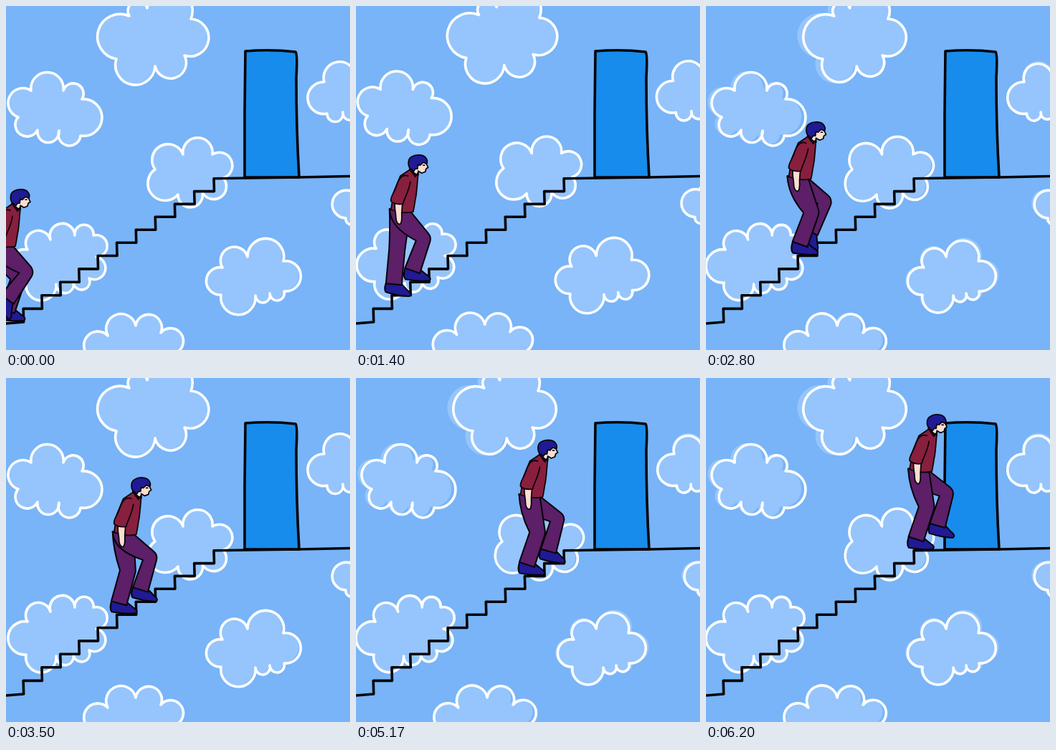
An HTML page with a canvas that plays this animation: 480 px wide and 480 px high, repeating every 6230 ms.

```html
<!DOCTYPE html>
<html lang="en">
<head>
<meta charset="utf-8">
<title>Stairs in the sky</title>
<style>
html, body { margin: 0; width: 100%; height: 100%; overflow: hidden; background: #78b4f7; }
canvas { display: block; width: 480px; height: 480px; }
</style>
</head>
<body>
<canvas id="stage" width="480" height="480"></canvas>
<script>
const ctx = document.getElementById('stage').getContext('2d');
const LOOP = 6230;
const INK = '#050308', SKIN = '#f9ded2', HAIR = '#201a94', SHIRT = '#881f3e', TROUSERS = '#5c1f68';

// A cloud is a ring of notches, clockwise, joined by arcs a little over a half circle.
function puffs(points) {
  const arcs = points.map(([x, y], i) => {
    const [px, py] = points.at(i - 1), r = 0.504 * Math.hypot(x - px, y - py);
    return `A${r},${r} 0 1 1 ${x},${y}`;
  });
  return new Path2D(`M${points.at(-1)}${arcs.join('')}Z`);
}

// The outline wobbles by moving its left and right ends; the last shape is also the fill.
const clouds = [];
function cloud(left, right, ...points) {
  const xs = points.map(p => p[0]), min = Math.min(...xs), span = Math.max(...xs) - min;
  const wobble = (amount, shift) => puffs(points.map(([x, y]) =>
    [x + amount * (left + (right - left) * (x - min) / span) + shift, y + shift]));
  clouds.push([wobble(0, 0), wobble(1, 0), wobble(0.15, -1.5)]);
}

cloud(9, -4, [154, 74], [172, 14], [197, 3], [258, 18], [249, 69], [208, 84]);
cloud(5, 5, [35, 118], [80, 118], [106, 130], [104, 181], [74, 174], [44, 173], [17, 155]);
cloud(0, -5, [448, 150], [444, 106], [488, 100], [490, 148], [470, 148]);
cloud(-4, 2, [208, 228], [247, 207], [288, 207], [303, 240], [274, 260], [240, 263]);
cloud(-3, -4, [30, 340], [62, 326], [96, 320], [122, 320], [126, 350], [116, 380], [94, 386], [70, 388], [28, 386]);
cloud(2, -7, [302, 365], [337, 350], [387, 356], [388, 398], [368, 401], [348, 404], [300, 403]);
cloud(0, 4, [118, 490], [142, 460], [181, 446], [216, 456], [240, 482]);
cloud(3, 3, [474, 296], [480, 258], [500, 270], [490, 296]);

// Corner of each stair: an even climb with a slight sag.
function stair(i) {
  const sag = 3 * Math.sin(Math.PI * i / 11);
  return [26.5 * i - 1.5 - sag, 441 - 18.2 * i - sag / 2];
}

const stairs = new Path2D('M-2,444 L0,443');
for (let i = 1; i < 12; i++) {
  const [x, y] = stair(i);
  stairs.lineTo(x + 0.5, stair(i - 1)[1]);
  stairs.lineTo(x, y);
}
stairs.lineTo(409, 239);
stairs.lineTo(482, 237.5);
const door = new Path2D('M333,239 L333,150 L334,63 Q370,60 404,64 Q407,67 405,100 Q405,170 409,239Z');

const shoe = new Path2D('M-10,-4 C-12,3 -13,8 -10,12 C0,14 12,15 23,14 C27,12 24,8 20,6 L9,-3Z');
const face = new Path2D('M-6,4 L12,-3 L13,2 L15,6 L12,8 L11,12 L6,14 L1,11 L1,17 L-8,12Z');
const hair = new Path2D('M-9,9 C-14,4 -14,-6 -8,-9 C-2,-13 9,-12 12,-7 C14,-4 14,-1 13,1 L8,-1 L4,3 L1,2 L0,8 L-3,8 L-5,11Z');
const torso = new Path2D('M-9,8 L-2,17 L1,15 C0,25 -1,40 -2,46 C-4,55 -4,60 -6,68 C-14,70 -26,69 -37,65 L-33,40 L-24,18Z');
const hand = new Path2D('M-31,54 C-33,62 -30,68 -30,76 C-30,82 -27,86 -24,85 C-21,82 -22,74 -22,70 L-21,56Z');
const sleeve = new Path2D('M-13,18 C-22,14 -27,24 -30,34 C-33,42 -38,47 -37,53 C-33,57 -27,58 -20,57 C-19,50 -12,40 -10,26');
const details = new Path2D('M-11,8 L-3,19 L1,13 M8,3 L10,3');

function paint(path, fill) {
  ctx.fillStyle = fill;
  ctx.fill(path);
  ctx.stroke(path);
}

// Point beside (x, y), in front of the line between two joints for a positive width.
function beside(x, y, from, to, width) {
  const dx = to[0] - from[0], dy = to[1] - from[1], d = width / Math.hypot(dx, dy);
  return [x + dy * d, y - dx * d];
}

// Thigh and shin are equally long, so the knee lies in front of the middle.
function leg(hip, [ax, ay, angle]) {
  const [hx, hy] = hip, ankle = [ax, ay], BONE = 47;
  const reach = Math.hypot(ax - hx, ay - hy) / 2;
  const bend = Math.sqrt(Math.max(0, BONE ** 2 - reach ** 2));
  const knee = beside((hx + ax) / 2, (hy + ay) / 2, hip, ankle, bend);

  ctx.save();
  ctx.translate(ax, ay);
  ctx.rotate(angle);
  paint(shoe, HAIR);
  ctx.restore();

  const path = new Path2D();
  path.moveTo(hx - 15, hy - 8);
  path.quadraticCurveTo(hx - 14, hy + 18, ...beside(...knee, hip, ankle, -11));
  path.lineTo(...beside(ax, ay, knee, ankle, -11));
  path.lineTo(...beside(ax, ay, knee, ankle, 11));
  path.arcTo(...beside(...knee, hip, ankle, 11), hx + 14, hy - 5, 12);
  path.lineTo(hx + 14, hy - 5);
  path.closePath();
  paint(path, TROUSERS);
}

const clamp = v => Math.min(1, Math.max(0, v));
const ease = v => (1 - Math.cos(Math.PI * clamp(v))) / 2;

// Two steps take eleven drawings; t runs through one step.
function walker(count) {
  const time = 5 + 2 * count, step = Math.floor(time / 11), t = time % 11 / 11;
  const x = 10 + 25 * t - 3 * Math.sin(2 * Math.PI * t), y = -166 - 17 * t;
  const hip = [x - 24, y + 72];
  const feet = [
    [3, -16, 0],
    [-23 + 56 * ease((t - 0.2) / 0.53), 3 - 38 * (1 - (1 - t) ** 4), 0.12 + 0.95 * Math.sin(Math.PI * clamp(t / 0.73))]
  ];
  if (step % 2) feet.reverse();

  ctx.save();
  ctx.translate(...stair(step));
  ctx.strokeStyle = INK;
  ctx.lineWidth = 2;
  for (const foot of feet) leg(hip, foot);
  ctx.translate(x, y);
  ctx.lineWidth = 1.7;
  paint(face, SKIN);
  paint(hair, HAIR);
  paint(torso, SHIRT);
  paint(hand, SKIN);
  paint(sleeve, SHIRT);
  ctx.stroke(details);
  ctx.restore();
}

function draw(now) {
  const tick = Math.floor((now % LOOP) * 0.03 + 0.101) % 187;
  ctx.lineJoin = ctx.lineCap = 'round';
  ctx.fillStyle = '#78b4f7';
  ctx.fillRect(0, 0, 480, 480);

  ctx.fillStyle = '#95c5fc';
  for (const shapes of clouds) ctx.fill(shapes[2]);
  ctx.strokeStyle = '#fff';
  ctx.lineWidth = 3.6;
  for (const shapes of clouds) ctx.stroke(shapes[Math.floor(tick / 5) % 3]);

  ctx.strokeStyle = INK;
  ctx.lineWidth = 3.6;
  paint(door, '#178cec');
  ctx.stroke(stairs);
  walker(Math.floor(tick / 3));
}

const start = performance.now();
function loop() {
  draw(performance.now() - start);
  requestAnimationFrame(loop);
}
loop();
</script>
</body>
</html>
```
